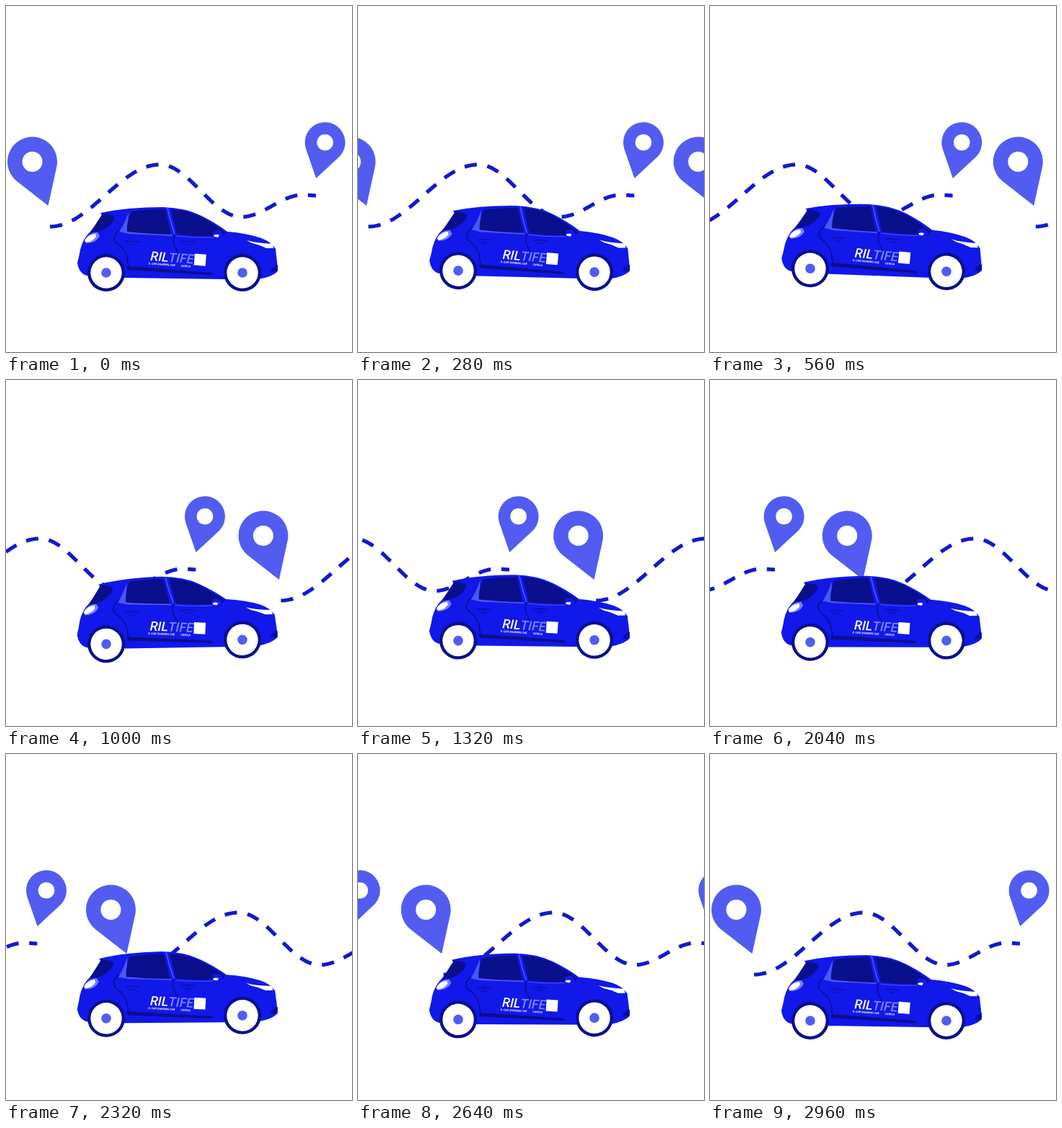
These frames come from a looping animation (480 px wide and 480 px high, 3000 ms). An HTML page with a canvas:

```html
<!DOCTYPE html>
<html lang="it">
<head>
<meta charset="utf-8">
<title>Car trip</title>
<style>
  html, body { margin: 0; width: 100%; height: 100%; overflow: hidden; background: #fff; }
  canvas { display: block; width: 480px; height: 480px; }
</style>
</head>
<body>
<canvas id="stage" width="480" height="480"></canvas>
<script>
const ctx = document.getElementById('stage').getContext('2d');
const LOOP = 3000, STEP = 40;
const BODY = '#1118ea', DARK = '#0a0f8c', LIGHT = '#4c55f5', PIN = '#525cf1', ROAD = '#1219cd';

// Turning points of the route, joined by half cosine waves.
const bends = [[61, 306], [213.5, 220], [326.5, 292.5], [412, 262], [430, 263]];
const route = [];
for (let i = 0; i < bends.length - 1; i++) {
  const [x0, y0] = bends[i], [x1, y1] = bends[i + 1];
  for (let k = 0; k <= 40; k++) {
    const u = k / 40;
    route.push([x0 + (x1 - x0) * u, y0 + (y1 - y0) * (1 - Math.cos(Math.PI * u)) / 2]);
  }
}
let routeLength = 0;
for (let i = 1; i < route.length; i++) {
  routeLength += Math.hypot(route[i][0] - route[i - 1][0], route[i][1] - route[i - 1][1]);
}
const dash = routeLength / 13.35;

// Height difference between front and rear wheel over time.
const tilts = [[0, 0], [560, 4], [1000, -6], [1320, -0.8], [1720, 0], [2320, -4], [3000, 0]];

function tiltAt(t) {
  let i = 0;
  while (t > tilts[i + 1][0]) i++;
  const [t0, a] = tilts[i], [t1, b] = tilts[i + 1];
  return a + (b - a) * (1 - Math.cos(Math.PI * (t - t0) / (t1 - t0))) / 2;
}

// The car climbs, rests at the top for a moment and sinks back.
function dropAt(t) {
  return Math.max(0, 10 - t / 150, (t - 1700) / 130);
}

function fill(color, d) {
  ctx.fillStyle = color;
  ctx.fill(new Path2D(d));
}

function line(color, width, d) {
  ctx.strokeStyle = color;
  ctx.lineWidth = width;
  ctx.stroke(new Path2D(d));
}

function disc(x, y, r, color) {
  ctx.fillStyle = color;
  ctx.beginPath();
  ctx.arc(x, y, r, 0, Math.PI * 2);
  ctx.fill();
}

function pin(x, y, r, tipX, tipY, hole) {
  const dir = Math.atan2(tipY - y, tipX - x);
  const half = Math.acos(r / Math.hypot(tipX - x, tipY - y));
  ctx.fillStyle = PIN;
  ctx.beginPath();
  ctx.moveTo(tipX, tipY);
  ctx.arc(x, y, r, dir + half, dir - half + Math.PI * 2);
  ctx.fill();
  disc(x, y, hole, '#fff');
}

function trip(offset) {
  ctx.save();
  ctx.translate(offset, 0);
  ctx.beginPath();
  ctx.rect(2, 0, 478, 480);
  ctx.clip();
  ctx.beginPath();
  route.forEach(([x, y]) => ctx.lineTo(x, y));
  ctx.setLineDash([dash * 0.54, dash * 0.46]);
  ctx.strokeStyle = ROAD;
  ctx.lineWidth = 5.2;
  ctx.stroke();
  pin(36.5, 216, 34.5, 58.5, 277, 14);
  pin(442.6, 189.3, 28, 430.2, 239, 11.3);
  ctx.restore();
}

function label() {
  ctx.save();
  ctx.translate(200, 343);
  ctx.rotate(0.075);
  ctx.font = 'italic 500 18px Roboto, sans-serif';
  ctx.fillStyle = '#fff';
  ctx.fillText('RIL', 0, 0);
  const w = ctx.measureText('RIL').width;
  ctx.fillStyle = '#7c84fa';
  ctx.fillText('TIFE', w, 0);
  ctx.fillStyle = '#fff';
  ctx.fillRect(61, -14, 16, 16);
  ctx.font = 'italic 700 3.9px Roboto, sans-serif';
  ctx.fillText('IL CAR SHARING CHE', -2, 5.5);
  ctx.fillText('CARICA', 43, 5.5);
  ctx.restore();
}

function wheel(x) {
  disc(x, 360, 26, DARK);
  disc(x, 360, 21.7, '#fff');
  disc(x, 360, 6.8, PIN);
}

function handle(x, y) {
  line(DARK, 1, `M${x} ${y} q10 -1.5 20 .5 M${x + 6} ${y + 3} q4 3 8 0`);
}

function car(drop, tilt) {
  ctx.save();
  ctx.translate(233.5, 360 + drop);
  ctx.rotate(Math.atan2(tilt, 189));
  ctx.translate(-233.5, -360);

  fill(BODY, `M131 277 Q168 269 218 269 Q249 270 271 281 Q291 291 307 303 Q333 305 354 312
    Q368 317 374 327 Q375 337 376 345 L377 358 Q369 366 350 369 L300 369 L165 367
    L112 364 Q101 361 99 346 Q102 335 103 328 Q107 312 117 303 L134 282 Z`);

  // Rear screen and lamps
  fill(DARK, 'M134 278 Q147 279 151 283 Q150 291 136 300 Q127 304 117 304 Z');
  fill('#7480fc', 'M109 316 Q114 304 127 304 L130 309 Q125 319 111 319 Z');
  fill('#fff', 'M109 315 Q114 307 124 306 L125 310 Q120 317 111 318 Z');
  fill('#fff', 'M334 315 Q347 319 370 320 L371 326 L361 326 Q351 321 341 319 Z');
  fill(DARK, 'M367 358 Q370 351 377 349 L377 356 Q372 360 367 358 Z');

  // Side windows
  fill(LIGHT, 'M170 276 Q164 293 157 303 L170 306 L231 309 L229 306 L169 302 Z');
  fill(DARK, 'M174 275 Q196 272 221 272 L229 307 Q195 306 168 303 Q167 289 174 275 Z');
  line(LIGHT, 1.6, 'M224 270 Q228 289 234 307');
  fill(DARK, 'M229 272 Q250 274 267 281 Q288 292 305 305 L300 310 Q268 310 237 307 Z');
  line(LIGHT, 1, 'M236 309 Q262 312 288 311');

  // Doors and sill
  line(DARK, 1.5, 'M158 300 Q147 309 152 317 Q165 327 168 338 L170 352');
  line(DARK, 1.5, 'M234 307 Q230 319 236 327 Q239 333 240 338');
  handle(166, 317);
  handle(243, 317);
  fill(DARK, 'M168 351 L190 352.5 L285 360 L288 363.5 L168 356 Z');

  // Mirror
  fill(BODY, 'M287 303 Q295 299 300 304 L302 311 L289 311 Z');
  fill('#fff', 'M288 308 Q293 306 296 308 L294 311 L289 310 Z');

  label();
  wheel(139);
  wheel(328);
  ctx.restore();
}

function draw(now) {
  // The closing step already shows the opening pose.
  const step = Math.floor((now % LOOP) / STEP);
  const t = (step % 74) * STEP;
  const u = t / LOOP;
  ctx.fillStyle = '#fff';
  ctx.fillRect(0, 0, 480, 480);
  trip(-500 * u);
  trip(480.5 * (1 - u));
  car(dropAt(t), tiltAt(t));
}

let start;
function tick(now) {
  if (start === undefined) start = now;
  draw(now - start);
  requestAnimationFrame(tick);
}
draw(0);
requestAnimationFrame(tick);
</script>
</body>
</html>
```
